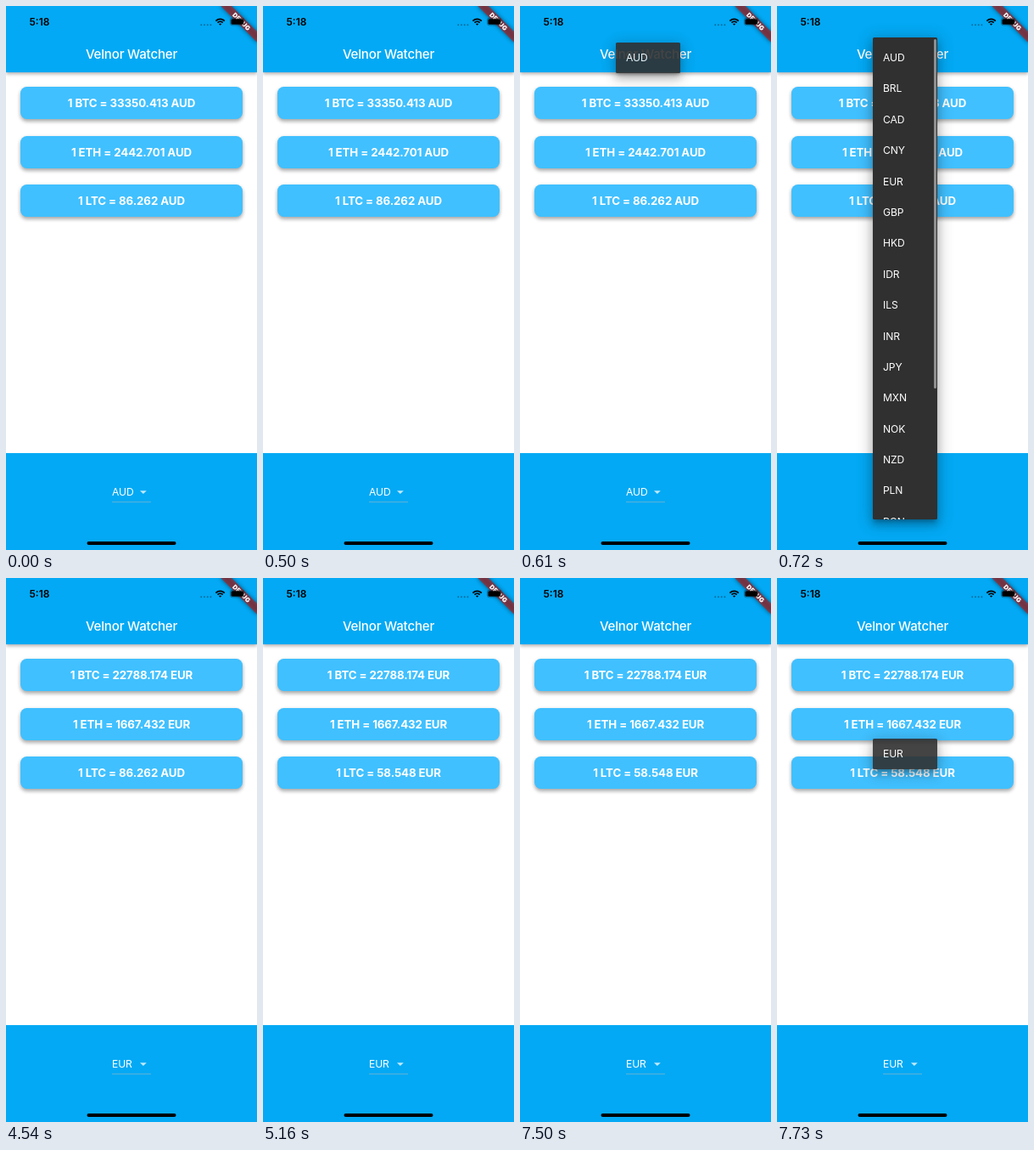
These frames come from a looping animation (296 px wide and 640 px high, 8000 ms). An HTML page:

```html
<!DOCTYPE html>
<html lang="en">
<head>
<meta charset="utf-8">
<title>Velnor Watcher</title>
<style>
  html, body { margin: 0; width: 100%; height: 100%; overflow: hidden; background: #fff; }
  body { position: relative; font: 12.1px Inter, "Liberation Sans", sans-serif; color: #fff; }
  div, svg { position: absolute; white-space: nowrap; }
  .bar { left: 0; width: 296px; background: #03a9f4; }
  #head { top: 0; height: 78px; box-shadow: 0 2px 4px rgba(0,0,0,.32); }
  #title { left: 0; width: 296px; top: 47px; line-height: 20px; text-align: center;
    font-size: 15.1px; font-weight: 500; letter-spacing: -.2px; }
  #time { left: 27.5px; top: 9px; line-height: 20px; color: #000; font-size: 12px; font-weight: 600; }
  .card { left: 17px; width: 262px; height: 38px; line-height: 38px; border-radius: 7.6px;
    background: #40c0ff; text-align: center; font-size: 13.3px; font-weight: 700;
    letter-spacing: -.1px; box-shadow: 0 3px 4px rgba(0,0,0,.28), 0 1px 5px rgba(0,0,0,.1); }
  #foot { top: 526px; height: 114px; }
  #pick { left: 125px; top: 562px; line-height: 20px; letter-spacing: -.1px; }
  #menu { left: 113px; width: 76px; overflow: hidden; border-radius: 1.5px; background: #303030;
    box-shadow: 0 4px 4px -2px rgba(0,0,0,.2), 0 6px 8px 1px rgba(0,0,0,.16), 0 3px 18px 3px rgba(0,0,0,.2); }
  #list { left: 12px; line-height: 36.4px; letter-spacing: -.1px; }
  #list div { position: static; height: 36.4px; }
  #thumb { right: 1.5px; top: 2px; width: 3px; height: 411px; border-radius: 1.5px; background: #8e8e8e; }
</style>
</head>
<body>
<div class="bar" id="head"></div>
<div id="title">Velnor Watcher</div>
<div class="bar" id="foot"></div>
<div id="pick"></div>
<svg width="296" height="640">
  <path d="M158 570.2h7.8l-3.9 3.9z" fill="#fff" opacity=".75"/>
  <path d="M125 583.5h46" stroke="#bdbdbd" stroke-width=".8" opacity=".6"/>
</svg>
<div id="menu"><div id="list"></div><div id="thumb"></div></div>
<svg width="296" height="640">
  <g transform="translate(296) rotate(45)">
    <rect x="-30.3" y="21.2" width="60.6" height="9.1" opacity=".5" style="filter: blur(2.4px)"/>
    <rect x="-30.3" y="21.2" width="60.6" height="9.1" fill="#b71c1c" opacity=".63"/>
    <text y="28.5" text-anchor="middle" fill="#fff" font-size="7.5" font-weight="900">DEBUG</text>
  </g>
  <path d="M230.3 22.2h12" stroke="#000" stroke-width="2" stroke-linecap="round"
    stroke-dasharray="0 3.7" opacity=".35"/>
  <g transform="translate(252.6 22.8)" fill="none" stroke="#000" stroke-width="1.8">
    <path d="M-5.2-5.2a7.35 7.35 0 0 1 10.4 0M-3.1-3.1a4.4 4.4 0 0 1 6.2 0"/>
    <path d="M0 0l-1.6-1.6a2.3 2.3 0 0 1 3.2 0z" fill="#000" stroke="none"/>
  </g>
  <rect x="264.4" y="14.2" width="16.8" height="8.6" rx="2.5" fill="none" stroke="#000" stroke-width=".8" opacity=".4"/>
  <rect x="265.4" y="15.2" width="14.8" height="6.6" rx="1.6"/>
  <path d="M282.2 17.1q1.4 1.4 0 2.8z" opacity=".45"/>
  <rect x="95.5" y="630" width="105" height="4" rx="2"/>
</svg>
<div id="time">5:18</div>

<script>
const LOOP = 8000, ROW = 36.4, LIST_TOP = 43;
const codes = "AUD BRL CAD CNY EUR GBP HKD IDR ILS INR JPY MXN NOK NZD PLN RON".split(" ");
const coins = [
  { name: "BTC", AUD: "33350.413", EUR: "22788.174", updated: 3970 },
  { name: "ETH", AUD: "2442.701", EUR: "1667.432", updated: 4540 },
  { name: "LTC", AUD: "86.262", EUR: "58.548", updated: 5160 }
];
const el = id => document.getElementById(id);

function addDiv(parent, text) {
  const div = document.createElement("div");
  div.textContent = text;
  parent.append(div);
  return div;
}

codes.forEach(code => addDiv(el("list"), code));
coins.forEach((coin, i) => {
  coin.card = addDiv(document.body, "");
  coin.card.className = "card";
  coin.card.style.top = 95 + 57.5 * i + "px";
});
document.body.append(el("menu"));

function setText(node, text) {
  if (node.textContent !== text) node.textContent = text;
}

function showMenu(top, height, opacity) {
  Object.assign(el("menu").style, { display: "block", top: top + "px", height: height + "px", opacity });
  el("list").style.top = LIST_TOP - top + "px";
  el("thumb").hidden = height === ROW;
}

// The menu first appears as the selected row alone.
const showRow = (code, opacity) => showMenu(LIST_TOP + codes.indexOf(code) * ROW, ROW, opacity);

function draw(now) {
  const t = now % LOOP;
  setText(el("pick"), t < 3480 ? "AUD" : "EUR");
  for (const coin of coins) {
    const code = t < coin.updated ? "AUD" : "EUR";
    setText(coin.card, `1 ${coin.name} = ${coin[code]} ${code}`);
  }
  if (t >= 7730) showRow("EUR", .9);
  else if (t >= 720 && t < 3480) showMenu(37, 566.5, 1);
  else if (t >= 610 && t < 720) showRow("AUD", .9);
  else el("menu").style.display = "none";
}

const start = performance.now();
function tick() {
  draw(performance.now() - start);
  requestAnimationFrame(tick);
}
tick();
</script>
</body>
</html>
```
